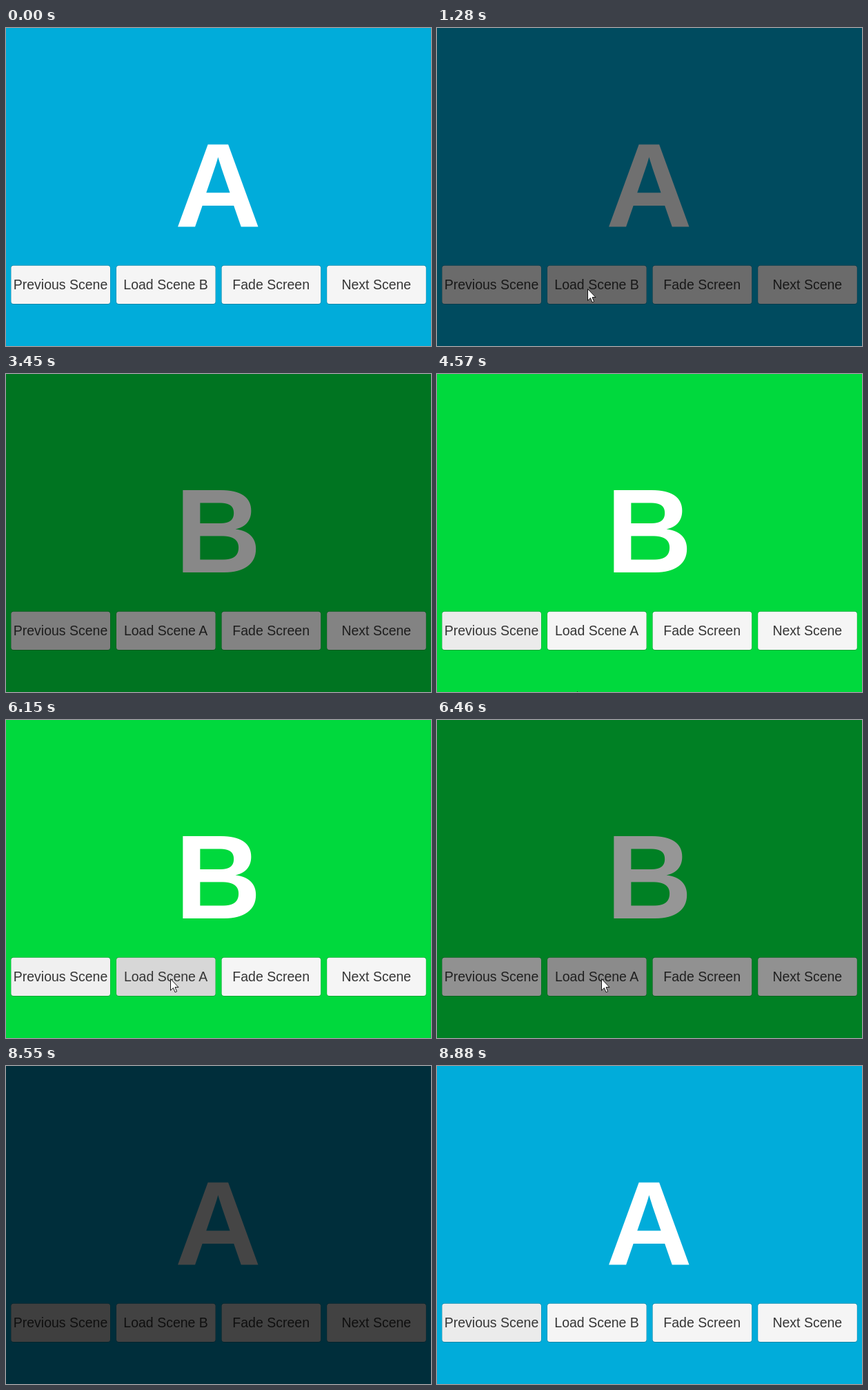
An HTML page for the animation above (9110 ms loop, 616x460 px).

```html
<!DOCTYPE html>
<html lang="en">
<head>
<meta charset="utf-8">
<title>Scene loader</title>
<style>
  html, body { margin: 0; width: 100%; height: 100%; overflow: hidden; background: #000; }
  svg { display: block; width: 616px; height: 460px; }
  text { text-anchor: middle; }
  .letter { font: bold 173.5px "Liberation Sans", Arial, sans-serif; fill: #fff; }
  .label { font: 19.5px "Liberation Sans", Arial, sans-serif; fill: #363636; }
  .title { font: italic bold 30px "DejaVu Sans", sans-serif; letter-spacing: 1.6px; stroke-linejoin: round; }
  .percent { font: bold 28px "DejaVu Sans", sans-serif; letter-spacing: 2.5px; fill: #fff; }
  .sign { font-weight: normal; }
</style>
</head>
<body>
<svg viewBox="0 0 616 460">
  <g id="scene">
    <rect id="back" width="616" height="460"/>
    <text id="letter" class="letter" x="307.5" y="287"></text>
    <g id="buttons"></g>
    <rect id="shade" width="616" height="460"/>
  </g>
  <g id="loading">
    <text class="title" x="309" y="238" fill="none" stroke="#85700f" stroke-width="2.6">Now Loading...</text>
    <text class="title" x="309" y="238" fill="#f9ce22" stroke="#f9ce22" stroke-width=".7">Now Loading...</text>
    <rect id="bar" x="162" y="255" width="292" height="5" fill="#fac922"/>
    <text class="percent" x="312" y="344"><tspan id="count"></tspan><tspan class="sign"> %</tspan></text>
  </g>
  <path id="cursor" d="M.5 .5V17.2L4.4 13.5L7.1 19.8L9.6 18.7L7 12.6H12Z" fill="#fff" stroke="#000" stroke-width=".9"/>
</svg>
<script>
const LOOP = 9110;
const NS = 'http://www.w3.org/2000/svg';
const $ = id => document.getElementById(id);
const clamp = v => Math.min(1, Math.max(0, v));
const ramp = (t, a, b) => clamp((t - a) / (b - a));
const mix = (a, b, k) => a + (b - a) * k;
const easeOut = k => 1 - (1 - k) * (1 - k);
const easeIn = k => k ** 1.5;

// Times of each scene change
const trips = [
  { press: 920, out: [1000, 1500], show: [1580, 2030], full: 2250, hide: [2615, 3100], enter: [3225, 3650] },
  { press: 6150, out: [6260, 6750], show: [6850, 7300], full: 7490, hide: [7850, 8330], enter: [8430, 8880] }
];
const scenes = {
  A: { color: '#01acda', other: 'B' },
  B: { color: '#00d93d', other: 'A' }
};
// Pointer visits: rest point, edge points and times
const visits = [
  { from: [205, 461], rest: [218, 377], to: [204, 462], enter: [0, 460], leave: [1500, 1890], hover: 220 },
  { from: [203, 459], rest: [238, 374], to: [203, 467], enter: [4570, 5540], leave: [7250, 7800], hover: 5000 }
];

function add(parent, tag, attrs) {
  const el = document.createElementNS(NS, tag);
  for (const name in attrs) el.setAttribute(name, attrs[name]);
  return parent.appendChild(el);
}

const buttons = ['Previous Scene', '', 'Fade Screen', 'Next Scene'].map((text, i) => {
  const x = 7 + i * 152.6;
  add($('buttons'), 'rect', { x, y: 343.2, width: 144.4, height: 56.6, rx: 4, fill: '#000', opacity: .3 });
  const face = add($('buttons'), 'rect', { x: x + .4, y: 343.7, width: 143.6, height: 55.4, rx: 3.5 });
  const label = add($('buttons'), 'text', { class: 'label', x: x + 72, y: 378 });
  label.textContent = text;
  return { face, label };
});

function setTint({ face }, tint) {
  const v = Math.round(245 * tint);
  face.setAttribute('fill', `rgb(${v},${v},${v})`);
}
buttons.forEach(button => setTint(button, 1));

function shadeAt(t) {
  for (const { out, enter } of trips)
    if (t < enter[1]) return ramp(t, ...out) - ramp(t, ...enter);
  return 0;
}

function loadTint(t, trip, visit) {
  const hover = ramp(t, visit.hover, visit.hover + 100);
  const press = ramp(t, trip.press - 45, trip.press + 55) - ramp(t, trip.out[0], trip.out[0] + 100);
  return t > trip.enter[0] ? 1 : 1 - .04 * hover - .18 * press;
}

function drawScene(t) {
  const name = t >= 3200 && t < 8400 ? 'B' : 'A';
  const { color, other } = scenes[name];
  $('back').setAttribute('fill', color);
  $('letter').textContent = name;
  buttons[1].label.textContent = 'Load Scene ' + other;
  const n = name === 'B' ? 1 : 0;
  const selected = t < 3200 ? 0 : t < 8400 ? 1 - ramp(t, 6105, 6205) : 1;
  setTint(buttons[0], 1 - .04 * selected);
  setTint(buttons[1], loadTint(t, trips[n], visits[n]));
  $('shade').setAttribute('opacity', shadeAt(t));
}

function drawLoading(t) {
  const trip = trips[t < 5000 ? 0 : 1];
  const done = t >= trip.full;
  $('loading').setAttribute('opacity', ramp(t, ...trip.show) - ramp(t, ...trip.hide));
  $('bar').setAttribute('width', done ? 292 : 0);
  $('count').textContent = done ? '100' : '0';
}

function drawCursor(t) {
  const v = visits.find(({ enter, leave }) => t >= enter[0] && t < leave[1]);
  $('cursor').setAttribute('visibility', v ? 'visible' : 'hidden');
  if (!v) return;
  const a = easeOut(ramp(t, ...v.enter));
  const b = easeIn(ramp(t, ...v.leave));
  const [x, y] = v.rest.map((p, i) => Math.round(mix(mix(v.from[i], p, a), v.to[i], b)));
  $('cursor').setAttribute('transform', `translate(${x} ${y})`);
}

function draw(t) {
  drawScene(t);
  drawLoading(t);
  drawCursor(t);
}

function tick() {
  draw(performance.now() % LOOP);
  requestAnimationFrame(tick);
}
tick();
</script>
</body>
</html>
```
